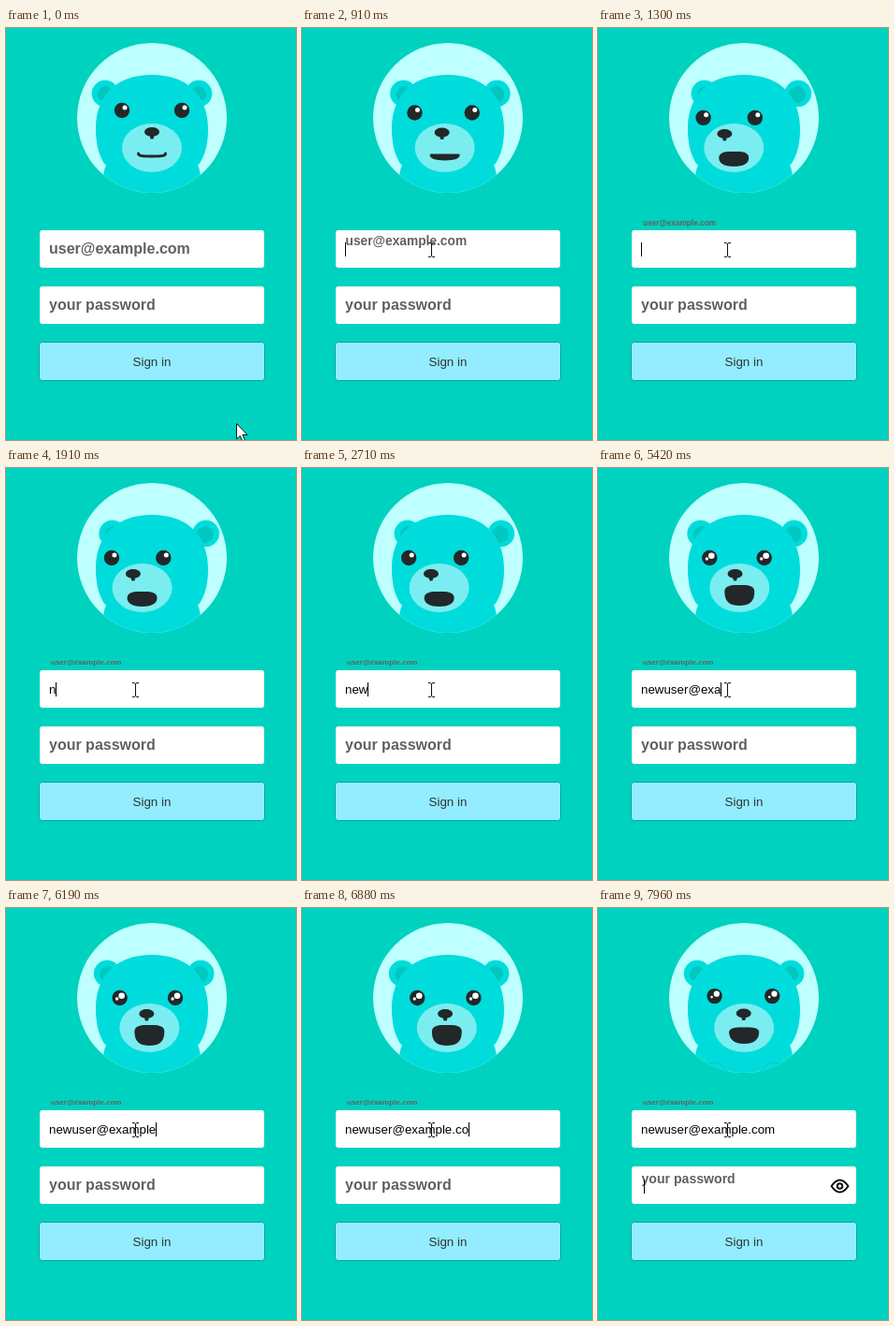
Recreate the animation shown at these times as an HTML page. Size 310 by 440 pixels, loop 8000 ms.

```html
<!DOCTYPE html>
<html lang="en">
<head>
<meta charset="utf-8">
<title>Sign in</title>
<style>
  html, body { margin: 0; height: 100%; overflow: hidden; background: #00d2c0; }
  svg { display: block; width: 310px; height: 440px; font: 13.333px "Liberation Sans", Arial, sans-serif; }
  .label { font-size: 16px; font-weight: bold; fill: #616161; }
  .skin { fill: #00dcdc; }
  .inner { fill: #00c7bf; }
  .dark { fill: #222829; }
</style>
</head>
<body>
<svg viewBox="0 0 310 440">
  <defs>
    <clipPath id="porthole"><circle cx="156" cy="96" r="80"/></clipPath>
    <g id="eye-base"><circle class="dark" r="8.2"/></g>
  </defs>

  <circle cx="156" cy="96" r="80" fill="#beffff"/>
  <g clip-path="url(#porthole)">
    <g id="ears">
      <circle class="skin" cx="106" cy="70" r="14.3"/>
      <circle class="inner" cx="107" cy="71" r="9"/>
      <circle class="skin" cx="206" cy="70" r="14.3"/>
      <circle class="inner" cx="205" cy="71" r="9"/>
    </g>
    <path class="skin" d="M96 108C96 70 120 50 156 50S216 70 216 108C216 128 211 140 205 147Q208 152 208 162V180H104V162Q104 152 107 147C101 140 96 128 96 108Z"/>
    <ellipse id="muzzle" cx="156" cy="128" rx="32" ry="26" fill="#7aedf0"/>
    <g id="left-eye"><use href="#eye-base"/><circle class="shine" fill="#fff"/><circle class="glint" cx="-3" cy="1" fill="#fff"/></g>
    <g id="right-eye"><use href="#eye-base"/><circle class="shine" fill="#fff"/><circle class="glint" cx="-3" cy="1" fill="#fff"/></g>
    <g id="nose" class="dark">
      <ellipse cx="156" cy="111" rx="8" ry="5"/>
      <rect x="154" y="113" width="4" height="5.5" rx="1.5"/>
    </g>
    <path id="mouth" class="dark" stroke="#222829" stroke-linecap="round" stroke-linejoin="round"/>
    <g id="paws" class="skin" stroke="#00c8ca">
      <ellipse cx="123" cy="24" rx="19" ry="24"/>
      <ellipse cx="189" cy="24" rx="19" ry="24"/>
    </g>
  </g>

  <rect x="36" y="216" width="240" height="40" rx="3" fill="#fff"/>
  <rect x="36" y="276" width="240" height="40" rx="3" fill="#fff"/>
  <rect x="35.5" y="335.5" width="241" height="41" rx="3" fill="#93edff" stroke="#00a59b"/>
  <text x="156" y="361" text-anchor="middle" fill="#333">Sign in</text>

  <text id="email-label" class="label">user@example.com</text>
  <text id="password-label" class="label">your password</text>
  <text id="typed" x="46" y="241"></text>
  <rect id="caret" width="1" height="15"/>

  <g id="reveal" fill="none" stroke="#111" stroke-width="2">
    <path d="M249.500 297Q258.500 284 267.500 297Q258.500 310 249.500 297Z" stroke-linejoin="round"/>
    <circle cx="258.500" cy="297" r="2.800"/>
  </g>

  <path id="arrow" d="M.5.5V17L4.300 13.500L7 19.500L9.500 18.400L6.900 12.500H12Z" fill="#fff" stroke="#111"/>
  <path id="beam" d="M-3 -7.500H-1L.5 -6.500L2 -7.500H4M.5 -6.500V6.500M-3 7.500H-1L.5 6.500L2 7.500H4" fill="none" stroke="#111"/>
</svg>

<script>
const LOOP = 8000, FOCUS = 820, SWITCH = 7885, TEXT_LEFT = 46;
const message = "newuser@example.com";
const keyTimes = [1680, 2080, 2560, 2860, 3260, 3410, 3610, 4660, 4880, 5120,
                  5350, 5520, 5750, 5920, 6190, 6420, 6620, 6830, 7420];
const atTime = keyTimes[message.indexOf("@")];

const $ = id => document.getElementById(id);
const mix = (a, b, k) => a + (b - a) * k;
const clamp = k => Math.min(1, Math.max(0, k));
const progress = (t, start, length) => clamp((t - start) / length);
const easeOut = k => 1 - (1 - k) ** 2;
const easeInOut = k => k * k * (3 - 2 * k);
const move = (id, x, y) => $(id).setAttribute("transform", `translate(${x} ${y})`);
const show = (id, on) => $(id).setAttribute("visibility", on ? "visible" : "hidden");
const setAttrs = (el, attrs) => { for (const k in attrs) el.setAttribute(k, attrs[k]); };

const widths = [...message, ""].map((_, i) => {
  $("typed").textContent = message.slice(0, i);
  return i ? $("typed").getComputedTextLength() : 0;
});

function drawLabel(id, baseline, k) {
  const x = mix(46, 48, k), y = mix(baseline, baseline - 31, k);
  $(id).setAttribute("transform", `translate(${x} ${y}) scale(${mix(1, 0.5, k)})`);
  $(id).style.fill = k > 0.5 ? "#665f5a" : "#616161";
}

function drawMouth(x, open, wide, rest) {
  // Blend closed smile, half-open and wide-open shapes.
  const shape = (smile, half, full) => mix(smile, mix(mix(smile, half, open), full, wide), 1 - rest);
  const side = shape(134, 139, 132), top = shape(137, 132, 125), bottom = shape(137, 148, 147);
  const half = shape(14.5, 16, 16), low = bottom - Math.min(3, (bottom - top) / 5);
  setAttrs($("mouth"), {
    d: `M${-half} ${side}C${-half} ${top} -8 ${top} 0 ${top}S${half} ${top} ${half} ${side}` +
       `C${half} ${low} 9 ${bottom} 0 ${bottom}S${-half} ${low} ${-half} ${side}Z`,
    "stroke-width": shape(3, 0, 0)
  });
  move("mouth", x, 0);
}

function drawEye(id, x, y, wide) {
  move(id, x, y);
  setAttrs($(id).querySelector(".shine"), { cx: mix(3, 2, wide), cy: mix(-3, -2.3, wide), r: mix(2.5, 3.3, wide) });
  $(id).querySelector(".glint").setAttribute("r", 1.7 * wide);
}

function drawBear(t) {
  const focus = easeOut(progress(t, FOCUS, 550));
  const rest = easeOut(progress(t, SWITCH, 600));
  const wide = easeOut(progress(t, atTime, 500));
  const gaze = focus * (1 - rest);
  const followed = keyTimes.reduce((sum, time, i) =>
    sum + (widths[i + 1] - widths[i]) * easeOut(progress(t, time, 400)), 0);
  const turn = (0.144 * followed - 21) * gaze;

  move("ears", -0.38 * turn, 0);
  move("muzzle", 0.54 * turn + gaze * 0.4, 0);
  move("nose", turn, 2 * gaze);
  drawEye("left-eye", 124 + 0.6 * turn + gaze, 88 + 8 * gaze, wide * (1 - rest));
  drawEye("right-eye", 188 + 0.88 * turn - 2 * gaze, 88 + 8 * gaze, wide * (1 - rest));
  drawMouth(156 + 0.54 * turn + gaze * 0.4, focus, wide, rest);
  move("paws", 0, mix(180, 117, rest));
}

function drawForm(t) {
  const onPassword = t >= SWITCH;
  const count = keyTimes.filter(time => time <= t).length;
  $("typed").textContent = message.slice(0, count);
  drawLabel("email-label", 241, easeOut(progress(t, FOCUS, 600)));
  drawLabel("password-label", 301, easeOut(progress(t, SWITCH, 600)));
  show("reveal", onPassword);

  const since = t - (onPassword ? SWITCH : count ? keyTimes[count - 1] : FOCUS);
  show("caret", since >= 0 && since % 1000 < 500);
  setAttrs($("caret"), {
    x: onPassword ? 49 : TEXT_LEFT + Math.round(widths[count]),
    y: onPassword ? 290 : 229
  });
}

function drawPointer(t) {
  const k = easeInOut(progress(t, 50, 540));
  const x = Math.round(mix(246, 138, k)), y = Math.round(mix(422, 237, k));
  const overField = y < 256 || (y > 276 && y < 316);
  show("arrow", !overField);
  show("beam", overField);
  move("arrow", x, y);
  move("beam", x, y);
}

function frame() {
  const t = performance.now() % LOOP;
  drawBear(t);
  drawForm(t);
  drawPointer(t);
  requestAnimationFrame(frame);
}
frame();
</script>
</body>
</html>
```
